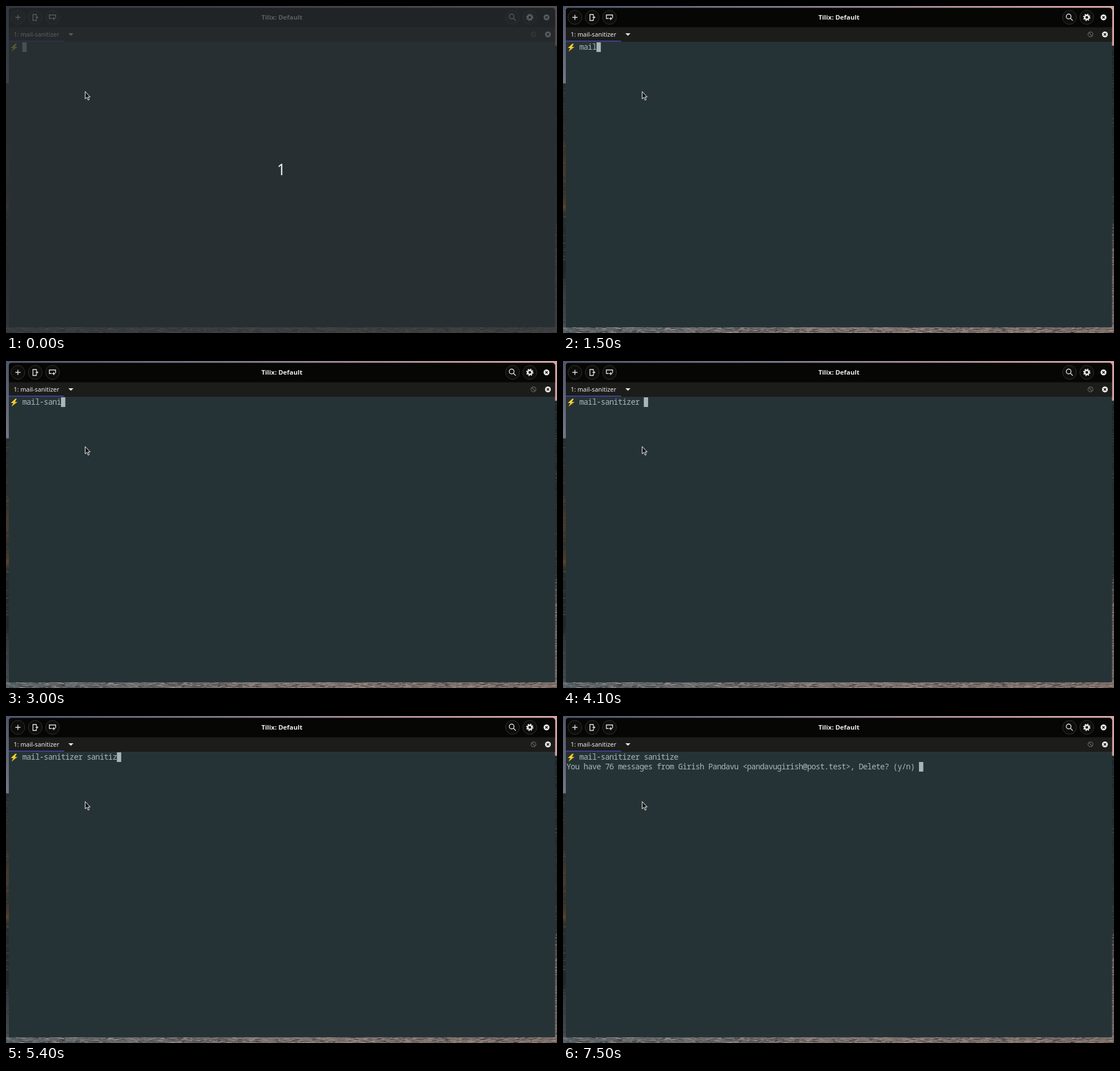
Recreate the animation shown at these times as an HTML page. Size 972x576 px, loop 8 s.

```html
<!DOCTYPE html>
<html lang="en">
<head>
<meta charset="utf-8">
<title>Terminal</title>
<style>
  html, body { margin: 0; width: 100%; height: 100%; overflow: hidden; background: #263336; }
  svg { display: block; width: 972px; height: 576px; }
  .ui { font-family: "Noto Sans", sans-serif; fill: #eeeeec; }
  .mono { font: 13.8px "Noto Sans Mono", monospace; letter-spacing: -.695px; fill: #a8b6ba; white-space: pre; }
  .line { fill: none; stroke: #e4e4e2; stroke-width: 1.4; }
</style>
</head>
<body>
<svg viewBox="0 0 972 576" xmlns="http://www.w3.org/2000/svg">
  <defs>
    <linearGradient id="sky">
      <stop offset="0" stop-color="#4d566c"/><stop offset=".45" stop-color="#85788c"/>
      <stop offset="1" stop-color="#d5a3a6"/>
    </linearGradient>
    <linearGradient id="left" x2="0" y2="1">
      <stop offset="0" stop-color="#4d566c"/><stop offset=".235" stop-color="#747684"/>
      <stop offset=".238" stop-color="#252e30"/><stop offset=".42" stop-color="#30302c"/>
      <stop offset=".49" stop-color="#493a2d"/><stop offset=".57" stop-color="#30302b"/>
      <stop offset=".615" stop-color="#5c4128"/><stop offset=".64" stop-color="#262d2d"/>
      <stop offset=".82" stop-color="#202729"/><stop offset=".86" stop-color="#323a3f"/>
      <stop offset="1" stop-color="#454e54"/>
    </linearGradient>
    <linearGradient id="right" x2="0" y2="1">
      <stop offset="0" stop-color="#d5a3a6"/><stop offset=".12" stop-color="#d3a09e"/>
      <stop offset=".123" stop-color="#1c292b"/><stop offset=".65" stop-color="#273233"/>
      <stop offset=".75" stop-color="#5b5453"/><stop offset="1" stop-color="#77696a"/>
    </linearGradient>
    <linearGradient id="lake">
      <stop offset="0" stop-color="#545f64"/><stop offset=".5" stop-color="#7b716e"/>
      <stop offset="1" stop-color="#7b6c67"/>
    </linearGradient>
  </defs>

  <rect width="972" height="576" fill="url(#sky)"/>
  <rect width="6" height="576" fill="url(#left)"/>
  <rect x="967" width="5" height="576" fill="url(#right)"/>
  <rect y="565" width="972" height="11" fill="url(#lake)"/>
  <g id="ripples"></g>

  <path d="M5 566V8.500q0-5 5-5h953.500q5 0 5 5V566z" fill="#263336"/>
  <path d="M5 63V8.500q0-5 5-5h953.500q5 0 5 5V63z" fill="#1c1c1a"/>
  <path d="M5 37.500V8.500q0-5 5-5h953.500q5 0 5 5V37.500z" fill="#060704"/>
  <rect x="5" y="61" width="97.500" height="1.700" fill="#4747a6"/>

  <g id="buttons" fill="#0d0e0b" stroke="#32332f"></g>
  <path class="line" d="M16.500 20h9M21 15.500v9" stroke-width="2"/>
  <path class="line" d="M53.500 17.500V15H47.500V25.500H53.500V22.500M52 20h5M54.500 17.500v5"/>
  <path class="line" d="M80.500 22H76.500V15.700H87.500V21M81.500 22.300h5.500M84.200 19.800v5"/>
  <circle class="line" cx="892" cy="18.500" r="4.200"/>
  <path class="line" d="M895 21.500l4.200 4.200" stroke-width="2"/>
  <g transform="translate(924 20)">
    <circle class="line" r="3.700" style="stroke-width:2.800"/>
    <circle class="line" r="5.500" style="stroke-width:2" stroke-dasharray="2.160"/>
  </g>
  <g id="closers"></g>
  <g fill="none" stroke="#5c5c59" stroke-width="1.400">
    <circle cx="930.500" cy="50" r="4.300"/><path d="M927.500 47l6 6"/>
  </g>
  <path d="M110 48h9l-4.500 4.500z" fill="#e4e4e2"/>
  <text class="ui" x="486.700" y="23.700" text-anchor="middle" font-size="11.450" font-weight="700">Tilix: Default</text>
  <text class="ui" x="13.500" y="53.800" font-size="10.850">1: mail-sanitizer</text>

  <path d="M16.500 66.500L8.500 74h4.300L10 80 20 72h-4.300L19 66.500z" fill="#f6d52b"/>
  <path d="M10 80L20 72H17.500L12 76z" fill="#eeb02c"/>
  <rect id="cursor" width="7.600" height="17" fill="#a8b6ba"/>
  <text id="command" class="mono" x="28.700" y="77.300"></text>
  <text id="prompt" class="mono" x="6" y="94.300"></text>

  <g id="countdown">
    <rect width="972" height="576" fill="#292e32" fill-opacity=".75"/>
    <text class="ui" x="485.500" y="298" text-anchor="middle" font-size="26.500">1</text>
  </g>
  <path d="M139.700 150.700v12.800l2.900-2.600 2.200 4.900 2.100-.9-2.200-4.700h3.800z" fill="#101414" stroke="#fff" stroke-linejoin="round"/>
</svg>
<script>
  const LOOP = 8000, CELL = 7.585, LEFT = 6;
  const COMMAND = "mail-sanitizer sanitize";
  const PROMPT = "You have 76 messages from Girish Pandavu <pandavugirish@post.test>, Delete? (y/n) ";
  const $ = id => document.getElementById(id);

  // [start ms, typed characters, cursor column (-1 = hidden), cursor row]
  const STEPS = [
    [0, 0, 3, 0], [300, 0, -1, 0], [700, 0, 3, 0], [1000, 2, 5, 0],
    [1300, 3, 6, 0], [1500, 4, 7, 0], [2000, 5, 8, 0], [2500, 7, 10, 0],
    [2700, 8, 11, 0], [3000, 9, 12, 0], [3500, 15, 18, 0], [3800, 15, -1, 0],
    [4100, 15, 18, 0], [4400, 17, 20, 0], [4500, 18, 21, 0], [4700, 19, 22, 0],
    [4800, 20, 23, 0], [5000, 21, 24, 0], [5400, 22, 25, 0], [5700, 23, 26, 0],
    [6000, 23, 0, 1], [6300, 23, -1, 1], [6900, 23, 0, 1], [7500, 23, 82, 1]
  ];

  function add(parent, tag, attrs) {
    const el = document.createElementNS("http://www.w3.org/2000/svg", tag);
    for (const key in attrs) el.setAttribute(key, attrs[key]);
    parent.append(el);
  }

  for (const cx of [21, 51.5, 82, 893.5, 924]) add($("buttons"), "circle", { cx, cy: 20, r: 12.3 });

  for (const [x, y] of [[953.5, 20], [956, 50]]) {
    add($("closers"), "circle", { cx: x, cy: y, r: 5.2, fill: "#e8e8e6" });
    add($("closers"), "path", { d: `M${x - 2} ${y - 2}l4 4m0-4l-4 4`, stroke: "#11110f", "stroke-width": 1.4 });
  }

  let seed = 17;
  const random = () => (seed = seed * 16807 % 2147483647) / 2147483647;

  // Scatters short strokes of dark and light over a strip of the backdrop.
  function scatter(count, x, y, width, height, length, light) {
    for (let i = 0; i < count; i++) add($("ripples"), "rect", {
      x: x + random() * width,
      y: y + Math.floor(random() * height),
      width: length * (.4 + random()),
      height: 1,
      fill: random() < .5 ? "#20292d" : light,
      opacity: .2 + random() * .45
    });
  }
  scatter(900, 0, 566, 972, 10, 7, "#bda296");
  scatter(150, 0, 138, 2, 428, 4, "#5e584e");
  scatter(110, 968, 72, 2, 300, 4, "#4a5351");
  scatter(90, 968, 370, 2, 196, 4, "#bda296");

  let shown = null;
  function draw(time) {
    const now = time % LOOP;
    const step = STEPS.findLast(s => s[0] <= now);
    if (step !== shown) {
      const [start, typed, column, row] = shown = step;
      $("command").textContent = COMMAND.slice(0, typed);
      $("prompt").textContent = start >= 7500 ? PROMPT : "";
      $("cursor").style.display = column < 0 ? "none" : "";
      $("cursor").setAttribute("x", LEFT + Math.max(column, 0) * CELL);
      $("cursor").setAttribute("y", 64 + row * 17);
      $("countdown").style.display = start < 300 ? "" : "none";
    }
  }

  const origin = performance.now();
  function tick() {
    draw(performance.now() - origin);
    requestAnimationFrame(tick);
  }
  tick();
</script>
</body>
</html>
```
